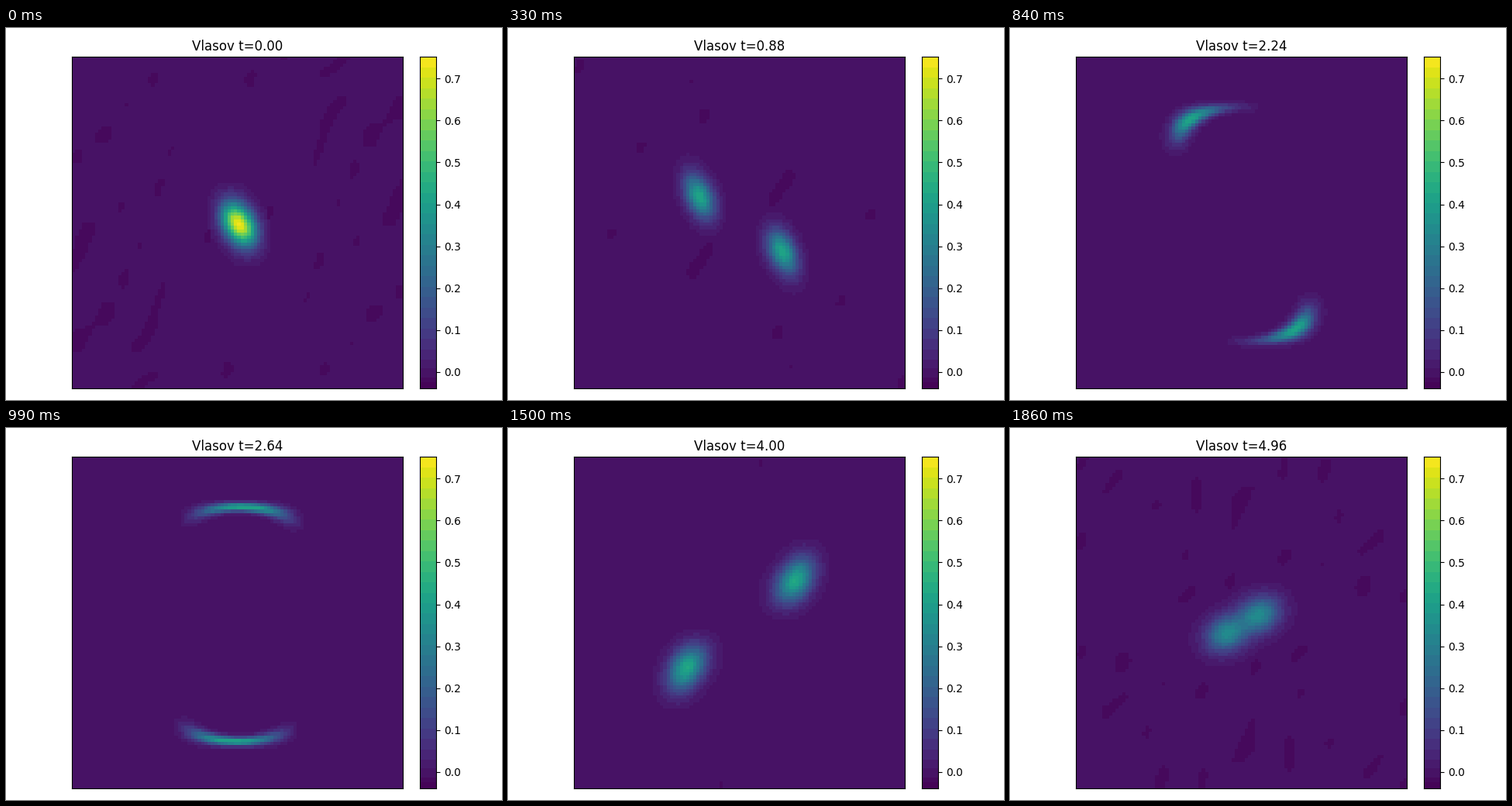
Write a matplotlib script that moves like this. It is 640 px wide and 480 px high and loops after 1.89 s.

```python
import numpy as np
import matplotlib.pyplot as plt
from matplotlib.animation import FuncAnimation

W, H, DPI = 640, 480, 100
FRAMES, DT = 63, 0.08
N, CELL = 100, 4.27
VMIN, VMAX = -0.0395, 0.7518

# Colour bands
BOUNDS = np.concatenate([[VMIN, -0.024, -0.013, 0.009], np.linspace(0.029, VMAX, 30)])
MIDS = (BOUNDS[1:] + BOUNDS[:-1]) / 2

# Phase space in pixels: velocity to the right, position downwards
axis = (np.arange(N) - N // 2) * CELL
V, Q = np.meshgrid(axis, axis)


def force(q):
    """Constant push away from the centre against a steep outer wall."""
    return 52 * (1 - (q / 102.2) ** 4)


def flow(v, q, dt, steps):
    path = [(v, q)]
    for _ in range(steps):
        v += force(q) * dt / 2
        q += v * dt
        v += force(q) * dt / 2
        path.append((v, q))
    return path


# One bunch follows this orbit, the other its point reflection
STEP, BEFORE, AFTER = 0.005, 120, 1100
PATH = np.array(flow(8, 8, -STEP, BEFORE)[:0:-1] + flow(8, 8, STEP, AFTER))
CLOCK = np.arange(-BEFORE, AFTER + 1) * STEP


def orbit(t):
    return np.interp(t, CLOCK, PATH[:, 0]), np.interp(t, CLOCK, PATH[:, 1])


def reflect(f):
    return np.roll(f[::-1, ::-1], 1, axis=(0, 1))


def bunches(t):
    """Gaussians strung along the orbit, squeezed near the wall."""
    early = np.exp(-(t / 1.8) ** 2)
    f = np.zeros((N, N))
    for lag in np.linspace(-0.45, 0.45, 31):
        v, q = orbit(t + lag)
        size = (12 - 9 * (q / 152) ** 4) * (1 + 0.05 * t)
        sv, sq = size * (1 - 0.38 * early), size * (1 + 0.35 * early)
        weight = np.exp(-(lag / 0.28) ** 2) / size
        f += weight * np.exp(-((V - v) / sv) ** 2 / 2 - ((Q - q) / sq) ** 2 / 2)
    f *= np.interp(t, [0, 0.4, 4.2, 4.96], [0.5, 0.42, 0.43, 0.34]) / f.max()
    return f + reflect(f)


# Slanted standing waves whose crests appear as faint dips
rng = np.random.default_rng(7)
WAVES = 40
angle = rng.normal(0.6, 0.5, (WAVES, 1, 1))
number = rng.normal(0.11, 0.03, (WAVES, 1, 1))
ripples = np.cos(number * (V * np.cos(angle) + Q * np.sin(angle)))
speed = rng.uniform(1, 4, WAVES)
phase = rng.uniform(0, 2 * np.pi, WAVES)


def dips(t):
    """Patches that thin out in mid-loop and return towards its end."""
    field = np.tensordot(np.cos(speed * t + phase), ripples, 1) * 2 / np.sqrt(WAVES)
    return field > 1.5 + 2 * np.sin(np.pi * (t / 5) ** 1.3) ** 2


def picture(t):
    f = bunches(t)
    f[dips(t) & (f < 0.009)] = -0.018
    return banded(f)


def banded(f):
    return MIDS[np.digitize(f, BOUNDS[1:-1])]


def pixel_axes(left, top, right, bottom):
    return fig.add_axes([left / W, 1 - bottom / H, (right - left) / W, (bottom - top) / H])


fig = plt.figure(figsize=(W / DPI, H / DPI), dpi=DPI)
colours = dict(cmap="viridis", vmin=VMIN, vmax=VMAX)

ax = pixel_axes(85.4, 37.3, 512.4, 465.2)
ax.set(xticks=[], yticks=[])
image = ax.imshow(picture(0), interpolation="nearest", aspect="auto", **colours)
title = ax.set_title("Vlasov t=0.00")

bar = pixel_axes(534.2, 37.3, 555.2, 465.2)
bar.pcolormesh([0, 1], BOUNDS, MIDS[:, None], **colours)
bar.set(xticks=[], xlim=(0, 1), ylim=(VMIN, VMAX), yticks=np.arange(8) / 10)
bar.yaxis.tick_right()


def update(n):
    t = n * DT
    image.set_data(picture(t))
    title.set_text(f"Vlasov t={t:.2f}")
    return image, title


anim = FuncAnimation(fig, update, frames=FRAMES, interval=30, repeat=True)
plt.show()
```
